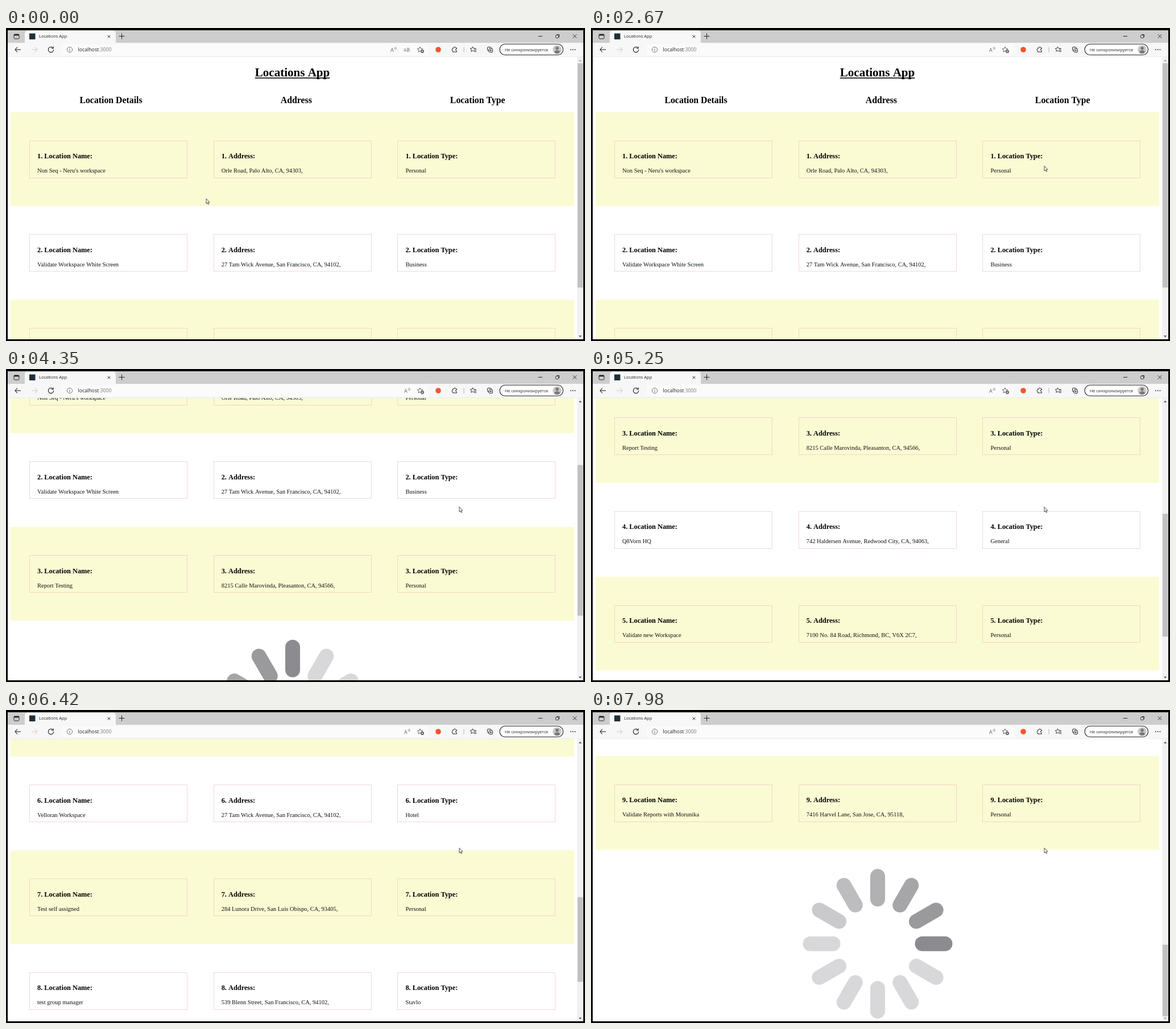
An HTML page with a canvas that plays this animation: 1018x550 px, repeating every 8000 ms.

```html
<!DOCTYPE html>
<html lang="en">
<head>
<meta charset="utf-8">
<title>Locations App</title>
<style>
html, body { margin: 0; width: 100%; height: 100%; overflow: hidden; background: #000; }
canvas { display: block; width: 1018px; height: 550px; }
</style>
</head>
<body>
<canvas id="stage" width="1018" height="550"></canvas>
<script>
const ctx = document.getElementById('stage').getContext('2d');
const LOOP = 8000, STEP = 90, SPIN_STEP = 80;
const SERIF = '"Liberation Serif", serif';
const SANS = '"Open Sans", "Noto Sans", sans-serif';
const VIEW = { top: 51, bottom: 547, height: 496 };
const HEAD = 97, ROW = 164.75, LOADER = 301, MARGIN = 8;

const places = [
  ["Non Seq - Neru's workspace", 'Orle Road, Palo Alto, CA, 94303,', 'Personal'],
  ['Validate Workspace White Screen', '27 Tam Wick Avenue, San Francisco, CA, 94102,', 'Business'],
  ['Report Testing', '8215 Calle Marovinda, Pleasanton, CA, 94566,', 'Personal'],
  ['Q8Vorn HQ', '742 Haldersen Avenue, Redwood City, CA, 94063,', 'General'],
  ['Validate new Workspace', '7100 No. 84 Road, Richmond, BC, V6X 2C7,', 'Personal'],
  ['Velloran Workspace', '27 Tam Wick Avenue, San Francisco, CA, 94102,', 'Hotel'],
  ['Test self assigned', '284 Lunora Drive, San Luis Obispo, CA, 93405,', 'Personal'],
  ['test group manager', '539 Blenn Street, San Francisco, CA, 94102,', 'Stavlo'],
  ['Validate Reports with Morunika', '7416 Harvel Lane, San Jose, CA, 95118,', 'Personal']
];
const fields = ['Location Name:', 'Address:', 'Location Type:'];

// [time, x, y]
const cursorPath = [
  [230, 352, 300], [320, 385, 290], [500, 453, 215], [680, 350, 120],
  [860, 175, 60], [1040, 79, 36], [1310, 79, 36], [1400, 110, 50],
  [1600, 300, 130], [1800, 560, 210], [2000, 750, 240], [2120, 797, 242.5]
];
// [time, offset]
const scrollPath = [
  [3530, 0], [3620, 45], [3710, 79], [3900, 79], [3990, 91], [4080, 103],
  [4170, 104], [4350, 200], [4530, 325], [4600, 342], [4980, 342], [5070, 362],
  [5250, 442], [5520, 555], [5700, 597], [5790, 602], [5880, 655], [5970, 743],
  [6150, 845], [6330, 890], [6900, 890], [6990, 970], [7080, 1070],
  [7170, 1124.5], [7440, 1131], [7620, 1131], [7710, 1190], [7800, 1290],
  [7890, 1365], [7980, 1385]
];
// [start, end, time when the top spoke is darkest]
const loads = [[1500, 2665, 1500], [4165, 4600, 4350], [5750, 6420, 5970], [7125, LOOP, 7700]];
const shades = ['#8c8b90', '#9a999c', '#a6a6a8', '#b1b1b3', '#bdbdbf', '#cacacc'];

function along(path, t) {
  const next = path.findIndex(p => p[0] > t);
  if (next === 0) return path[0].slice(1);
  if (next < 0) return path[path.length - 1].slice(1);
  const a = path[next - 1], b = path[next];
  const k = (t - a[0]) / (b[0] - a[0]);
  return a.slice(1).map((v, i) => v + (b[i + 1] - v) * k);
}

// The screen only refreshes once per step; pauses shift the phase.
function snap(t) {
  const shift = t < 3600 ? 50 : t < 3980 ? 20 : t < 6900 ? 30 : 60;
  return Math.floor((t - shift) / STEP) * STEP + shift;
}

function rect(x, y, w, h, color) {
  ctx.fillStyle = color;
  ctx.fillRect(x, y, w, h);
}

function text(str, x, y, font, color = '#000', align = 'left') {
  ctx.font = font;
  ctx.fillStyle = color;
  ctx.textAlign = align;
  ctx.fillText(str, x, y);
  return ctx.measureText(str).width;
}

function line(points, color = '#222', width = 1) {
  ctx.beginPath();
  for (let i = 0; i < points.length; i += 2) ctx.lineTo(points[i], points[i + 1]);
  ctx.strokeStyle = color;
  ctx.lineWidth = width;
  ctx.stroke();
}

function arc(x, y, r, from, to, color = '#222', width = 1) {
  ctx.beginPath();
  ctx.arc(x, y, r, from, to);
  ctx.strokeStyle = color;
  ctx.lineWidth = width;
  ctx.stroke();
}

function disc(x, y, r, color) {
  ctx.beginPath();
  ctx.arc(x, y, r, 0, Math.PI * 2);
  ctx.fillStyle = color;
  ctx.fill();
}

function round(x, y, w, h, r, fill, stroke, width = 1) {
  ctx.beginPath();
  ctx.roundRect(x, y, w, h, r);
  if (fill) { ctx.fillStyle = fill; ctx.fill(); }
  if (stroke) { ctx.strokeStyle = stroke; ctx.lineWidth = width; ctx.stroke(); }
}

function cross(x, y, r, color = '#222', width = 0.9) {
  line([x - r, y - r, x + r, y + r], color, width);
  line([x + r, y - r, x - r, y + r], color, width);
}

function star(x, y, r, color) {
  const points = [];
  for (let i = 0; i <= 10; i++) {
    const a = i * Math.PI / 5 - Math.PI / 2, d = i % 2 ? r * 0.48 : r;
    points.push(x + d * Math.cos(a), y + d * Math.sin(a));
  }
  line(points, color, 0.9);
}

function spinner(cx, cy, lead) {
  ctx.save();
  ctx.translate(cx, cy);
  ctx.lineCap = 'round';
  for (let i = 0; i < 12; i++) {
    const age = ((lead - i) % 12 + 12) % 12;
    line([0, -78.5, 0, -118.5], shades[age] || '#d8d8da', 26);
    ctx.rotate(Math.PI / 6);
  }
  ctx.restore();
}

function scrollbar(scroll, content) {
  rect(1004, VIEW.top, 11, VIEW.height, '#f1f1f1');
  const top = 62 + scroll / content * 476;
  rect(1005, top, 9.5, VIEW.height / content * 476, '#c1c1c1');
  const arrow = (y, dir, off) => {
    ctx.beginPath();
    ctx.moveTo(1007, y + dir * 1.5);
    ctx.lineTo(1009.6, y - dir * 1.5);
    ctx.lineTo(1012.2, y + dir * 1.5);
    ctx.fillStyle = off ? '#a3a3a3' : '#505050';
    ctx.fill();
  };
  arrow(57, 1, scroll <= 0);
  arrow(542, -1, scroll + VIEW.height >= content - 2);
}

function row(i, top) {
  if (top > VIEW.bottom || top + ROW < VIEW.top) return;
  if (i % 2 === 0) rect(8, top, 991, ROW, '#fafbd3');
  fields.forEach((label, c) => {
    const x = 41 + c * 323.7;
    ctx.strokeStyle = 'rgba(240,178,188,.55)';
    ctx.lineWidth = 1;
    ctx.strokeRect(Math.round(x) + 0.5, Math.round(top + 49.5) + 0.5, 277, 65);
    text(`${i + 1}. ${label}`, x + 14, top + 81, `bold 12.33px ${SERIF}`);
    text(places[i][c], x + 14, top + 106.2, `10.52px ${SERIF}`, '#111');
  });
}

function page(t, now) {
  rect(3, VIEW.top, 1012, VIEW.height, '#fff');
  if (t >= 1320 && t < 1500) return;
  const count = t >= 6420 ? 9 : t >= 4600 ? 6 : t >= 1320 && t < 2665 ? 0 : 3;
  const load = loads.find(l => t >= l[0] && t < l[1]);
  const scroll = along(scrollPath, now)[0];
  const content = HEAD + count * ROW + (load ? LOADER : MARGIN);
  const wide = content < VIEW.height ? 1 : 0;
  const y0 = VIEW.top - scroll;

  ctx.save();
  ctx.beginPath();
  ctx.rect(3, VIEW.top, 1012, VIEW.height);
  ctx.clip();
  const mid = 503.5 + wide * 5.5;
  const w = text('Locations App', mid, y0 + 34, `bold 21.04px ${SERIF}`, '#000', 'center');
  rect(mid - w / 2, y0 + 36, w, 1.6, '#000');
  [['Location Details', 184.5, 1.8], ['Address', 510.3, 5.5], ['Location Type', 829.2, 9.2]].forEach(
    ([label, x, shift]) => text(label, x + wide * shift, y0 + 80.5, `bold 15.8px ${SERIF}`, '#000', 'center'));

  for (let i = 0; i < count; i++) row(i, y0 + HEAD + i * ROW);
  if (load) {
    const lead = Math.floor((now - load[2]) / SPIN_STEP);
    spinner(504 + wide * 5.5, y0 + HEAD + count * ROW + 165, lead);
  }
  if (!wide) scrollbar(scroll, content);
  ctx.restore();
}

function tabStrip(busy, t) {
  rect(3, 4, 1012, 22, '#cdcdcd');
  round(14, 11, 9, 8, 1.5, null, '#222');
  rect(14, 11, 9, 2.3, '#222');
  round(33, 4.5, 160, 24, [5, 5, 0, 0], '#f7f7f7');
  if (busy) arc(46.5, 14.7, 4, t / 120, t / 120 + 4, '#2b72c8', 1.3);
  else rect(41, 9.5, 10.5, 10.5, '#20303a');
  text('Locations App', 58, 17.4, `7.5px ${SANS}`, '#222');
  cross(181, 15, 2.4);
  line([198.5, 14.5, 208.5, 14.5]);
  line([203.5, 9.5, 203.5, 19.5]);
  line([936, 14.5, 943, 14.5]);
  round(966.5, 12.5, 5, 5, 1, null, '#222', 0.9);
  line([968.5, 11.5, 972.5, 11.5, 972.5, 16], '#222', 0.9);
  cross(1000, 14.5, 3.3);
}

function readAloud(x) {
  text('A', x - 5, 41.5, `9px ${SANS}`, '#666');
  arc(x + 0.5, 36, 2.2, -0.9, 0.7, '#666', 0.8);
  arc(x + 0.5, 36, 4.5, -0.8, 0.5, '#666', 0.8);
}

function puzzle(x, y) {
  ctx.beginPath();
  ctx.moveTo(x - 3.5, y - 3);
  ctx.lineTo(x - 1.5, y - 3);
  ctx.arc(x, y - 3.3, 1.5, Math.PI, 0);
  ctx.lineTo(x + 3.5, y - 3);
  ctx.lineTo(x + 3.5, y - 1.5);
  ctx.arc(x + 3, y, 1.5, -Math.PI / 2, Math.PI / 2, true);
  ctx.lineTo(x + 3.5, y + 4);
  ctx.lineTo(x - 3.5, y + 4);
  ctx.lineTo(x - 3.5, y + 2);
  ctx.arc(x - 3.5, y + 0.3, 1.5, Math.PI / 2, -Math.PI / 2);
  ctx.closePath();
  ctx.strokeStyle = '#222';
  ctx.lineWidth = 1;
  ctx.stroke();
}

function toolbar(t, busy) {
  rect(3, 25, 1012, 26, '#f7f7f7');
  round(98, 28, 645, 20, 4, '#fbfbfb');
  rect(3, 50.4, 1012, 0.6, '#e6e6e6');
  if (t >= 1040 && t < 1410) round(66, 28, 26, 20, 3, t >= 1130 ? '#e2e2e2' : '#ececec');

  const arrow = (x, dir, color) => {
    line([x - 5, 38, x + 5, 38], color, 1.1);
    line([x + dir, 33.5, x + 5 * dir, 38, x + dir, 42.5], color, 1.1);
  };
  arrow(21, -1, '#222');
  arrow(50, 1, '#cfcfcf');
  if (busy) cross(79, 38, 4, '#222', 1.1);
  else {
    arc(79, 38, 4.6, 0, 5.5, '#222', 1.2);
    line([83.2, 32.5, 83.2, 35.8, 79.8, 35.8], '#222', 1.1);
  }

  arc(112, 38, 4.6, 0, 7, '#666', 0.9);
  rect(111.5, 37.3, 1, 3.2, '#666');
  rect(111.5, 35.3, 1, 1.1, '#666');
  const w = text('localhost', 126.5, 41, `8.75px ${SANS}`, '#222');
  text(':3000', 126.5 + w, 41, `8.75px ${SANS}`, '#777');

  if (t < 1320) {
    readAloud(681);
    text('aあ', 699, 41, '7.5px "Noto Sans CJK JP", "Noto Sans CJK", sans-serif', '#666');
  } else readAloud(705);
  star(728, 38, 5, '#555');
  disc(732, 41, 3, '#555');
  line([730.3, 41, 733.7, 41], '#fff', 0.8);
  line([732, 39.3, 732, 42.7], '#fff', 0.8);
  disc(760, 38, 4.8, '#f0562a');
  puzzle(789, 38);
  rect(804.6, 33.5, 0.9, 9, '#aaa');
  star(820.5, 37.5, 4.6, '#222');
  rect(822, 36, 6, 4.5, '#f7f7f7');
  line([823, 36.3, 827, 36.3]);
  line([822.5, 38.8, 827, 38.8]);
  line([823.5, 41.3, 827, 41.3]);
  round(846.5, 33.5, 6.5, 6.5, 1.5, null, '#222');
  round(849, 36, 6.5, 6.5, 1.5, '#f7f7f7', '#222');
  line([850.5, 39.2, 854, 39.2], '#222', 0.9);
  line([852.2, 37.5, 852.2, 41], '#222', 0.9);

  round(868, 28.3, 111.5, 19, 9.5, '#fff', '#222', 1.1);
  text('Не синхронизируется', 877, 40.7, `7.2px ${SANS}`, '#222');
  disc(969, 38, 7.8, '#c9c7c5');
  disc(969, 35.6, 2.8, '#7a7775');
  ctx.beginPath();
  ctx.ellipse(969, 42, 4.6, 2.7, 0, 0, 7);
  ctx.fill();
  for (let i = 0; i < 3; i++) disc(993 + i * 3.7, 38, 0.9, '#222');
}

function cursor(x, y) {
  ctx.save();
  ctx.translate(x, y);
  ctx.beginPath();
  [[0, 0], [0, 8.6], [2, 6.8], [3.3, 9.8], [4.7, 9.2], [3.5, 6.3], [5.9, 6.1]].forEach(p => ctx.lineTo(...p));
  ctx.closePath();
  ctx.fillStyle = '#fff';
  ctx.fill();
  ctx.strokeStyle = '#222';
  ctx.lineWidth = 0.8;
  ctx.stroke();
  ctx.restore();
}

function draw(t) {
  const now = snap(t);
  const busy = t >= 1320 && t < 1590;
  rect(0, 0, 1018, 550, '#000');
  page(t, now);
  toolbar(t, busy);
  tabStrip(busy, now);
  cursor(...along(cursorPath, now));
}

const start = performance.now();
function tick() {
  draw((performance.now() - start) % LOOP);
  requestAnimationFrame(tick);
}
tick();
</script>
</body>
</html>
```
